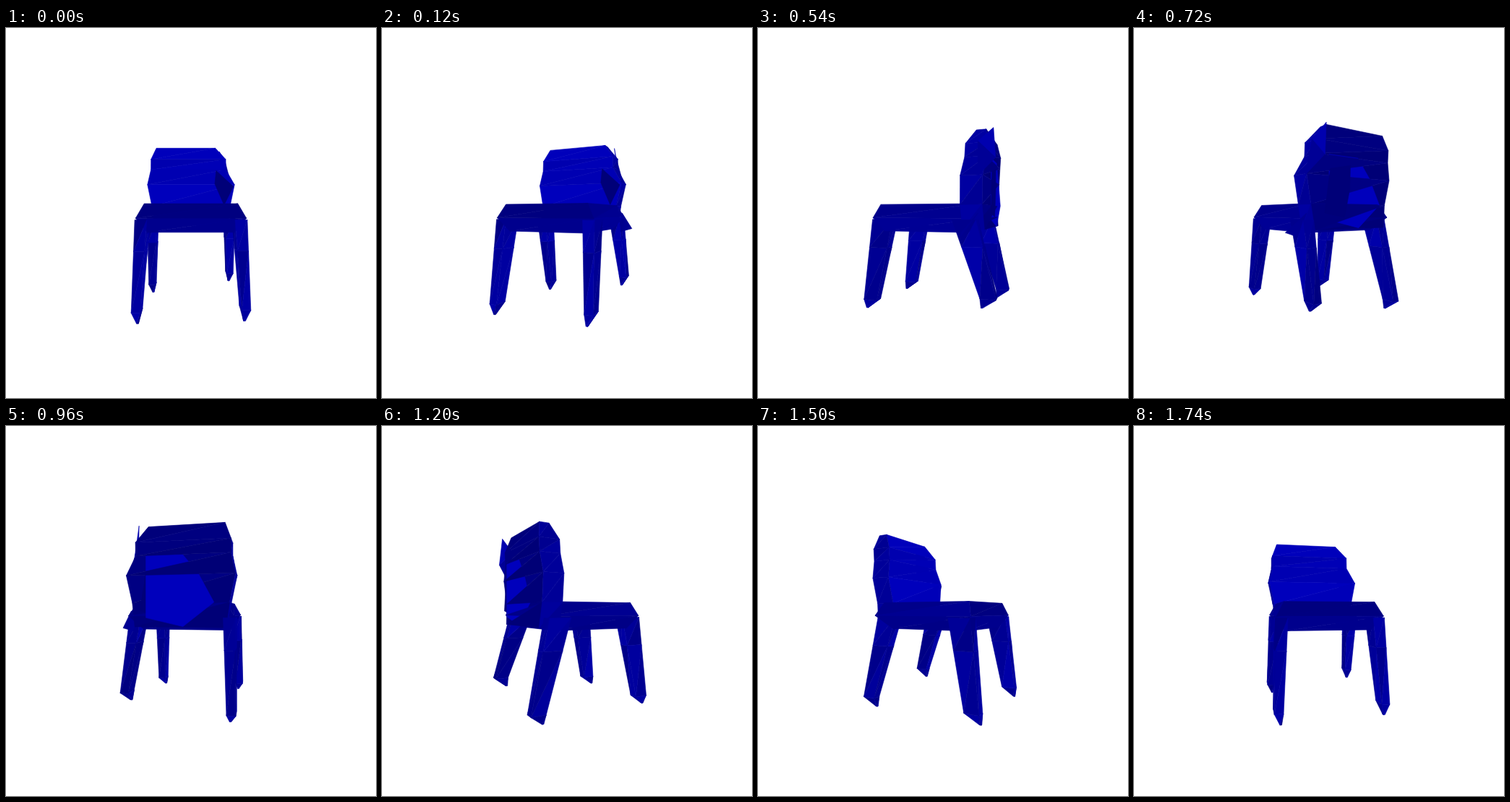
An HTML page with a canvas for the animation above (1800 ms loop, 512 by 512 pixels).

```html
<!DOCTYPE html>
<html lang="en">
<head>
<meta charset="utf-8">
<title>Turning chair</title>
<style>
html, body { margin: 0; width: 100%; height: 100%; overflow: hidden; background: #fff; }
canvas { display: block; }
</style>
</head>
<body>
<canvas id="stage" width="512" height="512"></canvas>
<script>
const ctx = document.getElementById('stage').getContext('2d');
const CENTER = 256, CAMERA = 435, STEP = 60, STEPS = 30;
const faces = [];

let seed = 7;
function random() {
  seed = (seed * 16807) % 2147483647;
  return seed / 2147483647;
}

function face(points, blue, twoSided = false) {
  faces.push({ points, color: `rgb(0,0,${Math.round(blue)})`, twoSided });
}

// Corners run front left, front right, back right, back left.
function ringCorners({ y, x = 0, z, w, d }) {
  return [[-1, 1], [1, 1], [1, -1], [-1, -1]].map(([i, k]) => [x + i * w, y, z + k * d]);
}

// Joins rectangles from bottom to top; tones are front, right, back, left.
function loft(rings, tones, spread) {
  const corners = rings.map(ringCorners);
  for (let r = 1; r < corners.length; r++) {
    const low = corners[r - 1], high = corners[r];
    tones.forEach((tone, i) => {
      const j = (i + 1) % 4;
      const blue = () => tone + (random() * 2 - 1) * spread;
      face([low[i], low[j], high[j]], blue());
      face([low[i], high[j], high[i]], blue());
    });
  }
}

// side: -1 left, 1 right; end: -1 back, 1 front; tip: height of the foot
function leg(side, end, tip) {
  const ring = t => ({
    y: -8 + (tip + 20) * t,
    x: side * (58 + 4 * t),
    z: end * (52 + 22 * t) + 6 * (1 - t),
    w: 7 - 2 * t,
    d: 14 - 5 * t
  });
  const foot = { y: tip, x: side * 60, z: end * 74 + 8, w: 1, d: 1 };
  loft([foot, ring(1), ring(0.35), ring(0)], [150, 155, 145, 150], 20);
}

function flat(outline, z, blue) {
  face(outline.map(([x, y]) => [x, y, z]), blue);
}

leg(-1, 1, -124);
leg(1, 1, -121);
leg(-1, -1, -126);
leg(1, -1, -108);

// Seat
loft([
  { y: -23, z: 8, w: 52, d: 54 },
  { y: -6, z: 3, w: 64, d: 69 },
  { y: 11, z: 4, w: 55, d: 62 }
], [135, 142, 132, 142], 8);

// Backrest
loft([
  { y: -19, z: -55, w: 55, d: 13 },
  { y: 10, z: -53, w: 59, d: 13 },
  { y: 43, z: -55, w: 66, d: 13 },
  { y: 66, x: -4, z: -57, w: 57, d: 13 },
  { y: 82, x: -4, z: -58, w: 57, d: 13 },
  { y: 101, x: -8, z: -61, w: 46, d: 6 }
], [182, 155, 124, 150], 7);

// Dark fold in front, light hollow and dark fold behind
flat([[38, 64], [36, 44], [50, 12], [64, 40]], -40, 120);
flat([[39, -8], [-6, -18], [-42, 10], [-24, 43], [-5, 66], [39, 66]], -73, 188);
flat([[46, 0], [17, -5], [9, 28], [8, 56], [38, 50]], -74, 120);

// Loose flaps on the right
const flap = [50, 64, -80], edge = [53, 84, -60];
face([[46, 100, -77], edge, flap], 175, true);
face([edge, flap, [64, 42, -62]], 150, true);
face([[62, 0, -62], [80, -22, -46], [60, -28, -41]], 145, true);

function project([x, y, z], cos, sin) {
  const depth = x * sin + z * cos;
  const scale = CAMERA / (CAMERA - depth);
  return [CENTER + (x * cos - z * sin) * scale, CENTER - y * scale, depth];
}

function area(shape) {
  return shape.reduce((sum, p, i) => {
    const q = shape[(i + 1) % shape.length];
    return sum + p[0] * q[1] - q[0] * p[1];
  }, 0);
}

function draw(time) {
  const step = Math.floor(time / STEP) % STEPS;
  const angle = step * 2 * Math.PI / STEPS;
  const cos = Math.cos(angle), sin = Math.sin(angle);
  const shapes = faces.map(({ points, color, twoSided }) => {
    const shape = points.map(p => project(p, cos, sin));
    const depth = shape.reduce((sum, p) => sum + p[2], 0) / shape.length;
    return { shape, depth, color, visible: twoSided || area(shape) < 0 };
  }).filter(s => s.visible).sort((a, b) => a.depth - b.depth);

  ctx.fillStyle = '#fff';
  ctx.fillRect(0, 0, 512, 512);
  ctx.lineWidth = 0.6;
  ctx.lineJoin = 'round';
  for (const { shape, color } of shapes) {
    ctx.fillStyle = ctx.strokeStyle = color;
    ctx.beginPath();
    for (const [x, y] of shape) ctx.lineTo(x, y);
    ctx.closePath();
    ctx.fill();
    ctx.stroke();
  }
}

const start = performance.now();
function tick() {
  draw(performance.now() - start);
  requestAnimationFrame(tick);
}
tick();
</script>
</body>
</html>
```
